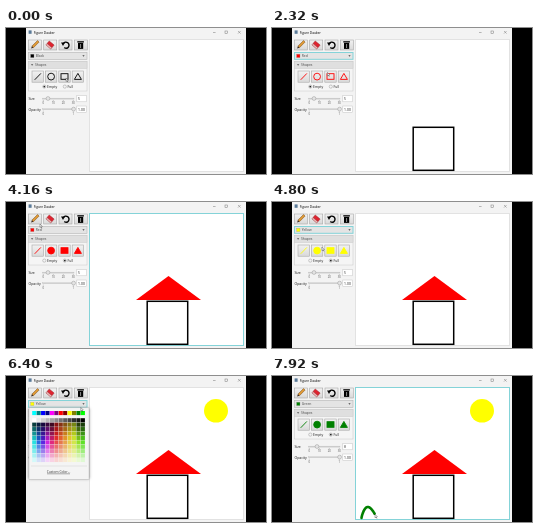
An HTML page with a canvas that plays this animation: 260 by 146 pixels, repeating every 8 s.

```html
<!DOCTYPE html>
<html lang="en">
<head>
<meta charset="utf-8">
<title>Figure Dauber</title>
<style>
html, body { margin: 0; width: 100%; height: 100%; overflow: hidden; background: #000; }
canvas { display: block; width: 260px; height: 146px; }
</style>
</head>
<body>
<canvas id="stage"></canvas>
<script>
const LOOP = 8000, STEP = 80, W = 260, H = 146;
const cv = document.getElementById('stage');
const dpr = window.devicePixelRatio || 1;
cv.width = W * dpr;
cv.height = H * dpr;
const c = cv.getContext('2d');
const INK = '#1c1c1c', CYAN = '#84d3d8';

// Session schedule in ms: [start, end]
const RECT = [640, 1200], ROOF = [3040, 3680], SUN = [5120, 5680], GRASS = [7280, 7920];
const POPUPS = [[2000, 2240], [4320, 4640], [6240, 6720]];
const COLORS = [['Black', '#000'], ['Red', '#f00'], ['Yellow', '#ff0'], ['Green', '#008000']];
const FULL_AT = 2440, SIZE_AT = 6960;

// Pointer arrivals: time, x, y
const stops = [
  [0, 60, 50],
  [RECT[0], 141, 99], [RECT[1], 182, 143], [1440, 176, 139],
  [1840, 52, 28], [POPUPS[0][1], 54, 37], [FULL_AT, 58, 58], [2880, 139, 98],
  [ROOF[0], 130, 74], [ROOF[1], 195, 98],
  [4160, 34, 22], [POPUPS[1][1], 64, 37], [4880, 45, 48],
  [SUN[0], 198, 23], [SUN[1], 222, 46.6],
  [6160, 76, 28], [POPUPS[2][1], 73, 37], [SIZE_AT, 45, 71],
  [GRASS[0], 89.5, 142]
];

const clamp = v => Math.max(0, Math.min(1, v));
const progress = (t, [a, b]) => clamp((t - a) / (b - a));
const during = (t, [a, b]) => t >= a && t < b;
const blade = p => [89.5 + 13.5 * p ** 1.3, 142 - 11 * Math.sin(2.8 * p)];

function pointer(t) {
  if (t >= GRASS[0]) return blade(progress(t, GRASS));
  const i = stops.findIndex(s => s[0] > t);
  const [t0, x0, y0] = stops[i - 1], [t1, x1, y1] = stops[i];
  const p = progress(t, [Math.max(t0, t1 - 640), t1]), e = p * p * (3 - 2 * p);
  return [x0 + (x1 - x0) * e, y0 + (y1 - y0) * e];
}

function box(x, y, w, h, fill, line, lw = .6) {
  if (fill) { c.fillStyle = fill; c.fillRect(x, y, w, h); }
  if (line) { c.strokeStyle = line; c.lineWidth = lw; c.strokeRect(x, y, w, h); }
}
function paint(fill, line, lw) {
  if (fill) { c.fillStyle = fill; c.fill(); }
  if (line) { c.strokeStyle = line; c.lineWidth = lw; c.stroke(); }
}
function poly(pts, fill, line, lw = 1) {
  c.beginPath();
  pts.forEach(p => c.lineTo(...p));
  c.closePath();
  paint(fill, line, lw);
}
function oval(x, y, rx, ry, fill, line, lw = 1) {
  c.beginPath();
  c.ellipse(x, y, rx, ry, 0, 0, 2 * Math.PI);
  paint(fill, line, lw);
}
function seg(x0, y0, x1, y1, color, lw = .5) {
  c.beginPath();
  c.moveTo(x0, y0);
  c.lineTo(x1, y1);
  paint(null, color, lw);
}
function text(s, x, y, size = 3.5, color = INK, align = 'left') {
  c.font = size + 'px "Open Sans", sans-serif';
  c.textAlign = align;
  c.fillStyle = color;
  c.fillText(s, x, y);
}
function button(x, y, w, h) {
  const g = c.createLinearGradient(0, y, 0, y + h);
  g.addColorStop(0, '#f2f2f2');
  g.addColorStop(1, '#d9d9d9');
  box(x, y, w, h, g, '#a8a8a8');
}
function triangle(x, y, w, h, fill, line, lw) {
  poly([[x + w / 2, y], [x + w, y + h], [x, y + h]], fill, line, lw);
}
function caret(x, y) {
  triangle(x, y + 1.5, 2.2, -1.5, '#444');
}
function placed(x, y, angle, fn) {
  c.save();
  c.translate(x, y);
  c.rotate(angle);
  fn();
  c.restore();
}

function titleBar() {
  box(20, 0, 220, 146, '#f3f3f3');
  box(22.6, 2.4, 3, 3.4, '#5a7a98');
  text('Figure Dauber', 27.8, 5.5, 3.2, '#000');
  seg(207, 4.5, 209.6, 4.5, '#777');
  box(219, 3, 2.4, 2.6, null, '#777', .5);
  seg(232, 3, 234.6, 5.6, '#777');
  seg(234.6, 3, 232, 5.6, '#777');
}

function toolbar() {
  for (let i = 0; i < 4; i++) button(22.4 + i * 15.3, 12, 13, 10);
  placed(28.8, 16.8, -Math.PI / 4, () => {
    box(-3, -1.1, 8, 2.2, '#e09a35', '#7a4c1c', .5);
    triangle(-1.1, -5, 2.2, 2, null);
    poly([[-5.2, 0], [-3, -1.1], [-3, 1.1]], '#33241a');
  });
  placed(44, 17, .7, () => {
    box(-3.2, -2.6, 6.4, 3.4, '#df2430', '#8e1c22', .4);
    box(-3.2, .8, 6.4, 1.8, '#f0b8b8', '#8e1c22', .4);
  });
  c.beginPath();
  c.arc(60, 17.2, 3, 3.7, 8.5);
  paint(null, '#000', 1.4);
  triangle(55, 18, 4, -3.4, '#000');
  box(71.3, 13.2, 6.6, 1.3, '#000');
  box(72, 14.9, 5.2, 6, '#000');
  seg(74.6, 16, 74.6, 20, '#ccc', .7);
}

function slider(label, y, knob, value, marks) {
  text(label, 22.4, y + 1);
  box(36.5, y - .9, 31.5, 1, '#cfcfcf', '#b8b8b8', .3);
  marks.forEach((m, i) => {
    const x = 37.3 + i * 30 / (marks.length - 1);
    seg(x, y + 1, x, y + 2, '#999');
    text(m, x, y + 5, 2.8, '#555', 'center');
  });
  oval(knob, y - .5, 1.9, 1.9, '#e4e4e4', '#999', .5);
  box(70.8, y - 3.6, 9.8, 6.4, '#fff', '#c4c4c4', .5);
  text(value, 72.1, y + .9, 3.4);
}
function radio(label, x, on) {
  oval(x, 58.6, 1.6, 1.6, '#f4f4f4', '#999', .5);
  if (on) oval(x, 58.6, .9, .9, '#222');
  text(label, x + 2.8, 59.8, 3.4);
}
function panel(t, [name, color], comboFocus) {
  box(22.5, 24.5, 58.5, 6.8, '#e4e4e4', comboFocus ? CYAN : '#b4b4b4', comboFocus ? 1 : .6);
  box(24.6, 26.2, 3.4, 3.4, color, '#999', .3);
  text(name, 29.7, 29.2, 3.4, '#444');
  caret(76.4, 27.2);

  box(22.5, 33.5, 58.5, 29.5, '#f5f5f5', '#c8c8c8', .5);
  box(22.5, 33.5, 58.5, 6.8, '#dfdfdf', '#c8c8c8', .5);
  caret(25, 36.2);
  text('Shapes', 29, 38.2, 3.4, '#444');
  for (let i = 0; i < 4; i++) button(26 + i * 13.4, 43, 11.4, 11.2);
  const full = t >= FULL_AT, fill = full ? color : null;
  seg(28.7, 51.8, 34.9, 45.4, color, .9);
  oval(45.1, 48.6, 3.4, 3.4, fill, color, .9);
  box(55, 45.7, 7, 5.6, fill, color, .9);
  triangle(68.4, 45.4, 7, 6, fill, color, .9);
  radio('Empty', 38.3, !full);
  radio('Full', 58.8, full);

  const grown = progress(t, [SIZE_AT - 160, SIZE_AT]);
  slider('Size', 71, 42 + 3 * grown, Math.round(5 + 3 * grown), [0, 10, 20, 30]);
  slider('Opacity', 81.6, 67.6, '1.00', [0, 1]);
}

// Shapes span the pointer's press and release points
function dragged(t, [a, b], shape) {
  if (t <= a) return;
  const [x, y] = pointer(a), [u, v] = pointer(Math.min(t, b));
  c.globalAlpha = t < b ? .6 : 1;
  shape(x, y, u - x, v - y);
  c.globalAlpha = 1;
}
function drawing(t) {
  dragged(t, RECT, (x, y, w, h) => box(x + .2, y + .3, w - .5, h - 1, null, '#000', 1.5));
  dragged(t, ROOF, (x, y, w, h) => triangle(x, y, w, h, '#f00'));
  dragged(t, SUN, (x, y, w, h) => oval(x + w / 2, y + h / 2, w / 2, h / 2, '#ff0'));
  if (t < GRASS[0]) return;
  c.save();
  c.lineCap = c.lineJoin = 'round';
  c.beginPath();
  for (let p = 0, end = progress(t, GRASS); p <= end; p += .02) c.lineTo(...blade(p));
  paint(null, '#008000', 2.6);
  c.restore();
}

const named = 'aqua teal blue navy fuchsia purple red maroon yellow olive green lime'.split(' ');
function palette() {
  c.save();
  c.shadowColor = '#0008';
  c.shadowBlur = 3 * dpr;
  box(23, 31.8, 60, 71.5, '#f4f4f4');
  c.restore();
  box(23, 31.8, 60, 71.5, null, '#c0c0c0', .5);
  const pitch = 4.42;
  named.forEach((color, i) => {
    const x = 26.2 + i * pitch, cell = (y, fill) => box(x, y, 4.1, 4.1, fill);
    const hue = i < 5 ? 180 + 38 * i : 17 * (i - 5);
    const dark = i > 4 && i < 10 ? 30 : 14;
    cell(35, color);
    cell(42.2, `hsl(0 0% ${100 - i * 100 / 11}%)`);
    for (let r = 0; r < 9; r++)
      cell(42.2 + (r + 1) * pitch, `hsl(${hue} 75% ${dark + (90 - dark) * r / 8}%)`);
  });
  seg(25, 90, 81, 90, '#ccc');
  text('Custom Color...', 52.5, 97, 3.3, '#333', 'center');
  seg(41, 97.8, 64, 97.8, '#555');
}
function arrow([x, y]) {
  poly([[x, y], [x, y + 3.4], [x + 2.4, y + 2.4]], '#fff', '#333', .4);
  seg(x + 1.1, y + 2.6, x + 1.9, y + 4.2, '#333');
}

function draw(t) {
  const color = COLORS[POPUPS.filter(p => t >= p[1]).length];
  // Focus goes to whichever was used last: the stage or the colour box
  const lastOf = list => Math.max(-1, ...list.map(s => s[0]).filter(a => a <= t));
  const onStage = lastOf([RECT, ROOF, SUN, GRASS]), onCombo = lastOf(POPUPS);
  c.setTransform(dpr, 0, 0, dpr, 0, 0);
  box(0, 0, W, H, '#000');
  titleBar();
  toolbar();
  panel(t, color, onCombo > onStage);
  box(83.5, 11.5, 154, 132, '#fff', onStage > onCombo ? CYAN : '#e2e2e2', 1);
  c.save();
  c.beginPath();
  c.rect(83, 11, 155, 133);
  c.clip();
  drawing(t);
  c.restore();
  if (POPUPS.some(p => during(t, p))) palette();
  arrow(pointer(t));
}
function tick(now) {
  draw(Math.floor(now % LOOP / STEP) * STEP);
  requestAnimationFrame(tick);
}
draw(0);
requestAnimationFrame(tick);
</script>
</body>
</html>
```
